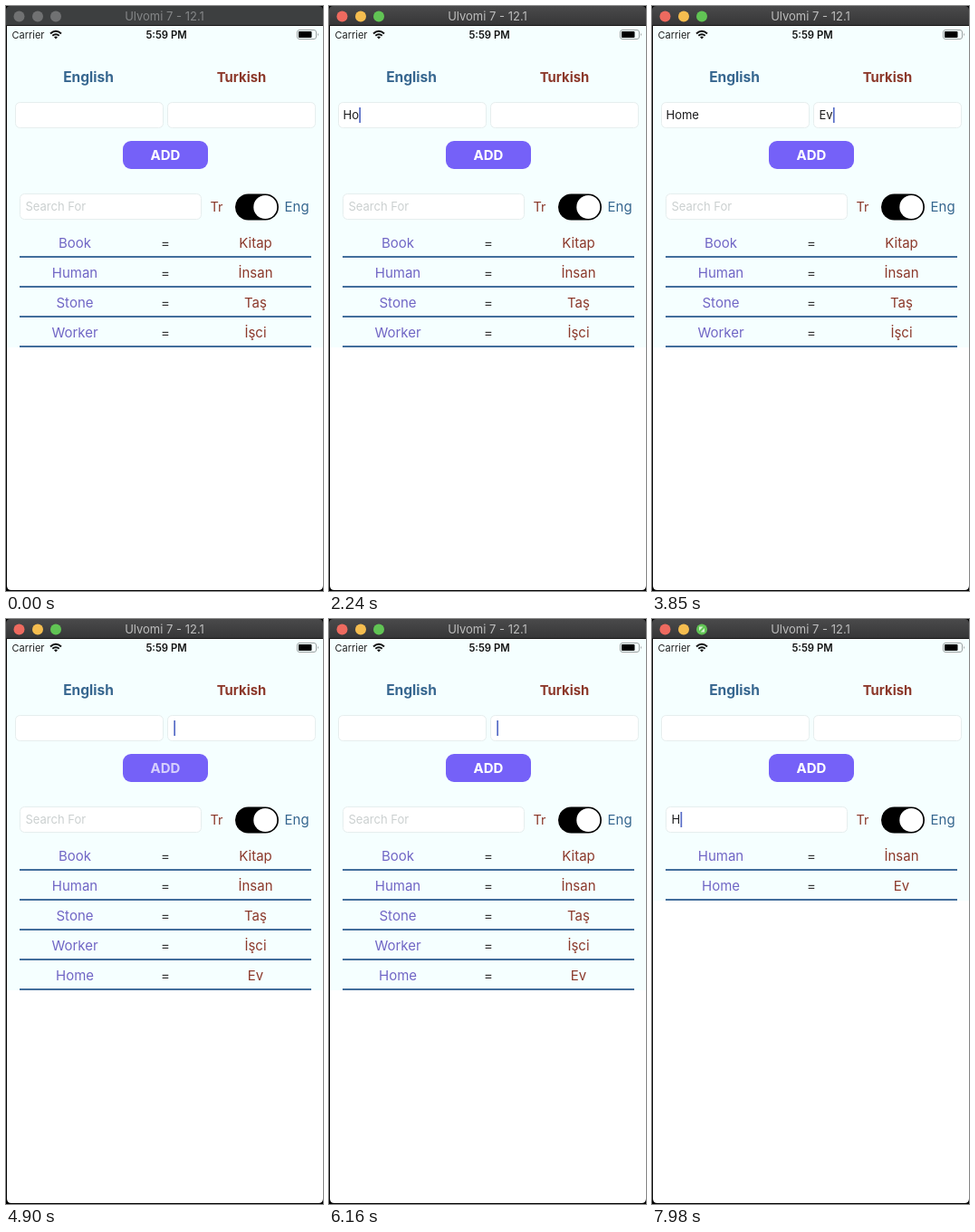
Write an HTML page that moves like this. It is 350 px wide and 646 px high and loops after 8 s.

```html
<!DOCTYPE html>
<html lang="en">
<head>
<meta charset="utf-8">
<title>Word list</title>
<style>
  html, body { margin: 0; width: 100%; height: 100%; overflow: hidden; background: #000; }
  svg { display: block; width: 350px; height: 646px; }
  text { font-family: Inter, Roboto, sans-serif; font-size: 15px; }
  .mid { text-anchor: middle; }
  .small { font-size: 13px; }
  .bold { font-weight: 700; }
  .eng { fill: #36668f; }
  .tur { fill: #8c392b; }
  .word { fill: #7065c5; }
  .field { fill: #fff; stroke: #e6eeee; }
  .rule { fill: #426e9c; }
</style>
</head>
<body>
<svg viewBox="0 0 350 646">
  <defs>
    <linearGradient id="bar" x2="0" y2="1">
      <stop stop-color="#4a4a4b"/><stop offset="1" stop-color="#363637"/>
    </linearGradient>
  </defs>
  <rect width="350" height="646" fill="#000"/>
  <path d="M1 22H350V640Q350 645 345 645H6Q1 645 1 640Z" fill="#fff"/>
  <rect id="tint" x="1" y="22" width="349" fill="#f5ffff"/>

  <path id="titlebar" d="M0 21.500V5Q0 0 5 0H345Q350 0 350 5V21.500Z"/>
  <rect y="21" width="350" height="1" fill="#161616"/>
  <g id="lights">
    <circle cx="14.500" cy="11.500" r="6"/>
    <circle cx="35" cy="11.500" r="6"/>
    <circle cx="55" cy="11.500" r="6"/>
  </g>
  <path id="zoom" d="M52 8.500h4.500l-4.500 4.500zM58 14.500h-4.500l4.500-4.500z" fill="#d5f2cf"/>
  <text id="title" class="mid small" x="175" y="16">Ulvomi 7 - 12.1</text>

  <text x="6.500" y="35.500" font-size="11" style="font-size:11px" fill="#222">Carrier</text>
  <g fill="none" stroke="#111" stroke-width="1.900">
    <path d="M49 30.500Q55 25 61 30.500"/>
    <path d="M51.300 32.800Q55 29.500 58.700 32.800"/>
  </g>
  <path d="M53 34.300Q55 32.600 57 34.300L55 36.500Z" fill="#111"/>
  <text class="mid" x="177" y="35.500" style="font-size:11.300px;font-weight:600" fill="#111">5:59 PM</text>
  <rect x="321.500" y="26.500" width="21" height="10" rx="2.500" fill="none" stroke="#9ba1a1"/>
  <rect x="323" y="28" width="14.500" height="7" rx="1" fill="#000"/>
  <path d="M344 30Q346 31.500 344 33Z" fill="#9ba1a1"/>

  <text class="mid bold eng" x="91" y="84" style="font-size:15.500px">English</text>
  <text class="mid bold tur" x="260" y="84" style="font-size:14.800px">Turkish</text>
  <rect class="field" x="10.500" y="106.500" width="163" height="28" rx="5"/>
  <rect class="field" x="178.500" y="106.500" width="163" height="28" rx="5"/>
  <rect x="129" y="149" width="94" height="31" rx="9" fill="#7561f8"/>
  <text id="add" class="mid bold" x="176" y="170" fill="#fff">ADD</text>

  <rect class="field" x="15.500" y="207.500" width="200" height="28" rx="5"/>
  <text id="hint" class="small" x="21.500" y="226" fill="#cbd0d0">Search For</text>
  <text class="tur" x="225.500" y="227" style="font-size:14.500px">Tr</text>
  <rect x="253" y="207.500" width="48" height="29" rx="14.500" fill="#000"/>
  <circle cx="286.300" cy="222" r="13" fill="#fff"/>
  <text class="eng" x="307.500" y="227">Eng</text>

  <g id="inputs" class="small" fill="#1c1c1e">
    <text class="small" x="15.500" y="125"></text>
    <text class="small" x="184.500" y="125"></text>
    <text class="small" x="21.500" y="226"></text>
  </g>
  <rect id="caret" width="1.700" height="17" fill="#566bc6"/>
  <g id="rows"></g>
</svg>
<script>
const LOOP = 8000, ACTIVATE = 350, PRESS = 4690, RELEASE = 4800, ZOOM_HOVER = 7910;
const FIELDS = [[15.5, 112], [184.5, 112], [21.5, 213]];

// start time, focused field, contents of the three fields, words in the list
const STEPS = [
  [0, -1, ['', '', ''], 4],
  [560, 0, ['', '', ''], 4],
  [1890, 0, ['H', '', ''], 4],
  [2170, 0, ['Ho', '', ''], 4],
  [2450, 0, ['Hom', '', ''], 4],
  [2660, 0, ['Home', '', ''], 4],
  [3080, 1, ['Home', '', ''], 4],
  [3500, 1, ['Home', 'E', ''], 4],
  [3710, 1, ['Home', 'Ev', ''], 4],
  [4830, 1, ['', '', ''], 5],
  [6650, 2, ['', '', ''], 5],
  [7630, 2, ['', '', 'H'], 5]
];
const WORDS = [['Book', 'Kitap'], ['Human', 'İnsan'], ['Stone', 'Taş'], ['Worker', 'İşci'], ['Home', 'Ev']];

const $ = id => document.getElementById(id);
const clamp = v => Math.max(0, Math.min(1, v));
const inputs = [...$('inputs').children];
const lights = [...$('lights').children];

const rows = WORDS.map(([english, turkish]) => {
  const row = document.createElementNS('http://www.w3.org/2000/svg', 'g');
  row.innerHTML = `<text class="mid word" x="76" y="267">${english}</text>
    <text class="mid" x="176" y="267" fill="#333">=</text>
    <text class="mid tur" x="275.5" y="267">${turkish}</text>
    <rect class="rule" x="15" y="276" width="322" height="2"/>`;
  $('rows').append(row);
  return row;
});

function showList(count, query) {
  let shown = 0;
  rows.forEach((row, i) => {
    const visible = i < count && WORDS[i][0].startsWith(query);
    row.style.display = visible ? '' : 'none';
    if (visible) row.setAttribute('transform', `translate(0 ${33 * shown++})`);
  });
  $('tint').setAttribute('height', 223 + 33 * shown);
}

function showCaret(field, age) {
  const caret = $('caret');
  if (field < 0) return caret.setAttribute('opacity', 0);
  const [x, y] = FIELDS[field];
  const width = inputs[field].textContent ? inputs[field].getComputedTextLength() : 0.5;
  const phase = age % 1000;
  caret.setAttribute('x', x + width + 0.3);
  caret.setAttribute('y', y);
  caret.setAttribute('opacity', Math.max(1 - clamp((phase - 550) / 100), clamp((phase - 900) / 100)));
}

function showWindow(t) {
  const active = t >= ACTIVATE;
  const colors = active ? ['#ee6a5f', '#f5bd4f', '#61c454'] : ['#707172', '#707172', '#707172'];
  lights.forEach((light, i) => light.setAttribute('fill', colors[i]));
  $('titlebar').setAttribute('fill', active ? 'url(#bar)' : '#3d3f40');
  $('title').setAttribute('fill', active ? '#bdbdbd' : '#848687');
  $('zoom').setAttribute('opacity', t >= ZOOM_HOVER ? 1 : 0);
}

function draw(t) {
  const [start, focus, values, count] = STEPS.filter(step => step[0] <= t).pop();
  inputs.forEach((input, i) => input.textContent = values[i]);
  $('hint').style.display = values[2] ? 'none' : '';
  showWindow(t);
  showList(count, values[2]);
  showCaret(focus, t - start);
  const pressed = clamp((t - PRESS) / 80) - clamp((t - RELEASE) / 200);
  $('add').setAttribute('opacity', 1 - 0.6 * pressed);
}

function tick() {
  draw(performance.now() % LOOP);
  requestAnimationFrame(tick);
}
tick();
</script>
</body>
</html>
```
